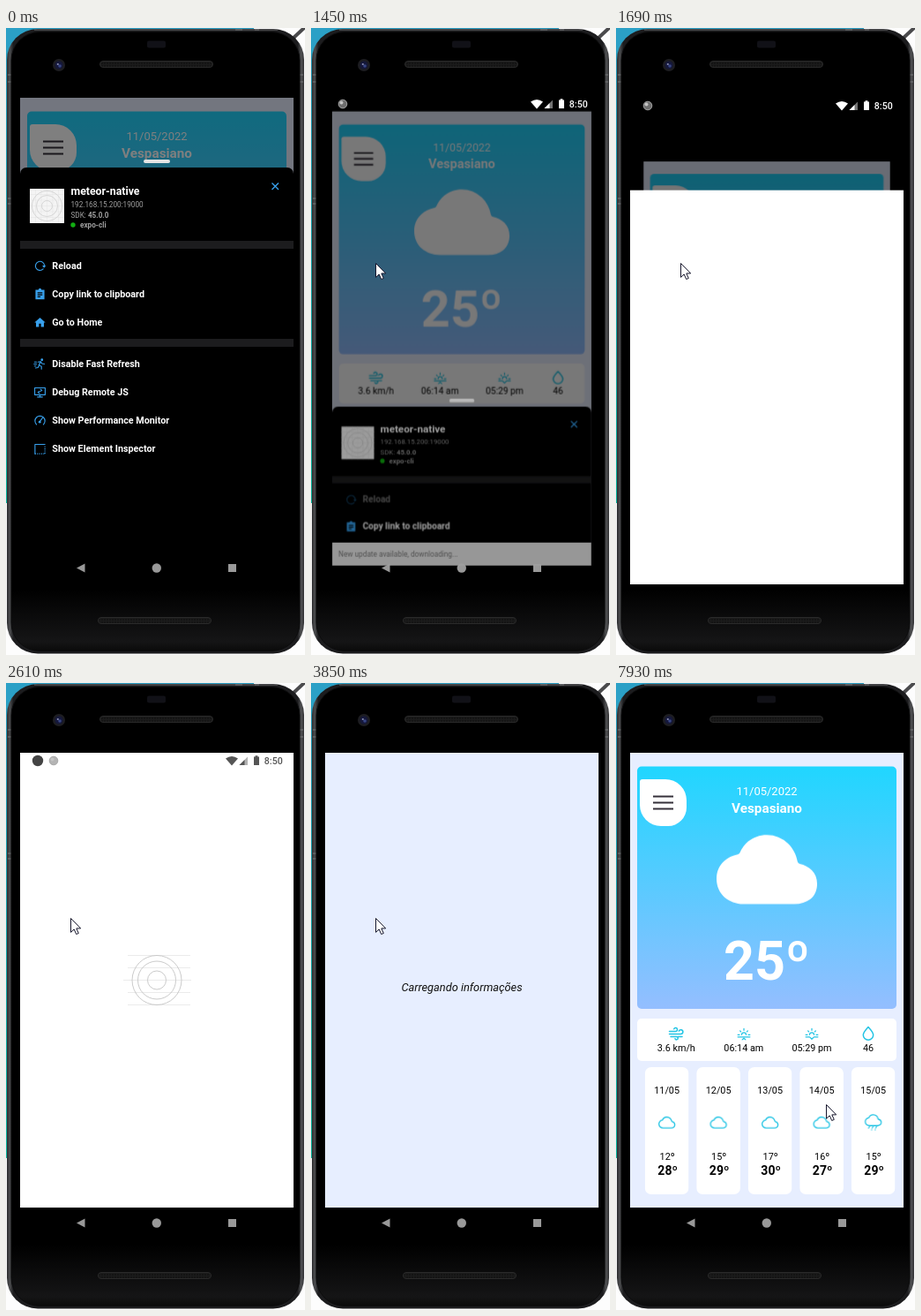
An HTML page that plays this animation: 339 px wide and 710 px high, repeating every 7.99 s.

```html
<!DOCTYPE html>
<html lang="pt">
<head>
<meta charset="utf-8">
<title>Weather app reload</title>
<style>
html,body{margin:0;width:100%;height:100%;overflow:hidden;background:#fdfdfd}
svg{display:block;width:100vw;height:100vh}
text{font-family:Roboto,sans-serif}
.mid{text-anchor:middle}
.b{font-weight:700}
.s{font-size:10.8px}
.row{font-size:10.75px;font-weight:700;fill:#fff}
.tiny{font-size:8.2px;fill:#a0a0a0}
.ln{fill:none;stroke:currentColor;stroke-width:2;stroke-linecap:round;stroke-linejoin:round}
.thin{stroke-width:1.5}
#cursor,#act,#veil,#sheet,#menu,#rise,#splash,#logo,#note,#status,#dot,#badge{animation:7990ms linear infinite}
#reload,#toast,#load,.late,.head,.temp,.nudge{animation:7990ms step-end infinite}

#cursor{animation-name:cursor}
@keyframes cursor{
  0%,4.4%{transform:translate(322px,716px);animation-timing-function:cubic-bezier(.35,.1,.35,1)}
  12.6%{transform:translate(61px,254px);animation-timing-function:ease-in-out}
  14.268%,91.9%{transform:translate(73px,266px);animation-timing-function:cubic-bezier(.4,.1,.4,1)}
  99.249%,100%{transform:translate(238px,477px)}
}
#act{animation-name:act;transform-origin:171px 354.5px}
@keyframes act{
  0%,16.5%{transform:none;opacity:1}
  18.148%{transform:translateY(1px) scale(.948);opacity:.95}
  21.151%{transform:translateY(44.5px) scale(.9);opacity:.92}
  23%{transform:translateY(70px) scale(.88);opacity:.9;animation-timing-function:step-end}
  23.03%{transform:none;opacity:0;animation-timing-function:step-end}
  81.977%,100%{transform:none;opacity:1}
}
#veil{animation-name:veil}
@keyframes veil{0%,23%{opacity:.5}23.01%,100%{opacity:0}}
#sheet{animation-name:sheet}
@keyframes sheet{
  0%,15.6%{transform:none;opacity:1;animation-timing-function:cubic-bezier(.4,0,.8,.8)}
  18.148%{transform:translateY(272px);opacity:1}
  19.7%{transform:translateY(446px);opacity:1}
  23%{transform:translateY(446px);opacity:1;animation-timing-function:step-end}
  23.01%,100%{transform:translateY(446px);opacity:0}
}
#menu{animation-name:menu}
@keyframes menu{0%,15.6%{opacity:1}18.148%{opacity:.68}19.7%,100%{opacity:.5}}
#reload{animation-name:reload}
@keyframes reload{0%{opacity:1}15.019%,100%{opacity:.45}}
#toast{animation-name:toast}
@keyframes toast{0%{opacity:0}17.27%{opacity:1}23%,100%{opacity:0}}
#rise{animation-name:rise}
@keyframes rise{
  0%,18.4%{transform:translateY(551px);animation-timing-function:cubic-bezier(.3,.4,.6,.85)}
  21.151%{transform:translateY(106px);animation-timing-function:cubic-bezier(.3,.5,.6,1)}
  22.9%,23%{transform:none;animation-timing-function:step-end}
  23.03%,100%{transform:translateY(560px)}
}
#splash{animation-name:splash}
@keyframes splash{
  0%{opacity:0;animation-timing-function:step-end}
  22.9%,43%{opacity:1}
  48%,100%{opacity:0}
}
#logo,#badge{animation-name:logo}
@keyframes logo{0%,26.8%{opacity:0}30.413%,100%{opacity:1}}
#note{animation-name:note}
@keyframes note{0%,26.8%{opacity:0}29%{opacity:1;animation-timing-function:step-end}32.666%,100%{opacity:0}}
#load{animation-name:load}
@keyframes load{0%{opacity:0}43%{opacity:1}81.977%,100%{opacity:0}}
#status{animation-name:status}
@keyframes status{
  0%,16.6%{color:#fff;transform:translateY(-12px);opacity:0}
  17.2%{opacity:1}
  18.148%{color:#fff;transform:translateY(-2px)}
  18.9%,26.8%{color:#fff;transform:none}
  30.413%{color:#555;transform:none}
  43%{opacity:1}
  46%,100%{color:#555;transform:none;opacity:0}
}
#dot{animation-name:dot}
@keyframes dot{
  0%,22.2%{opacity:1;transform:none;color:#6e6e6e}
  22.65%{opacity:0;transform:none;color:#6e6e6e;animation-timing-function:step-end}
  26.8%{opacity:0;transform:translateX(18px);color:#b4b4b4}
  30.413%,100%{opacity:1;transform:translateX(18px);color:#b4b4b4}
}
.late{animation-name:late}
@keyframes late{0%{opacity:1}50%{opacity:0}83.479%,100%{opacity:1}}
.head{animation-name:head}
@keyframes head{0%{transform:none}50%{transform:translateY(53px)}83.479%,100%{transform:none}}
.temp{animation-name:temp}
@keyframes temp{0%{transform:none}50%{transform:translateY(-53px)}83.479%,100%{transform:none}}
.nudge{animation-name:nudge}
@keyframes nudge{0%{transform:none}50%{transform:translateY(-1px)}83.479%,100%{transform:none}}
</style>
</head>
<body>
<svg viewBox="0 0 339 710" preserveAspectRatio="none">
<defs>
  <linearGradient id="teal" x2="0" y2="1"><stop stop-color="#2ba0c6"/><stop offset="1" stop-color="#0fbfa6"/></linearGradient>
  <linearGradient id="rim"><stop stop-color="#2e2e30"/><stop offset=".01" stop-color="#4c4d4f"/><stop offset=".022" stop-color="#1c1c1e"/><stop offset=".978" stop-color="#1c1c1e"/><stop offset=".99" stop-color="#505153"/><stop offset="1" stop-color="#343436"/></linearGradient>
  <linearGradient id="face" x2="0" y2="1"><stop offset=".9" stop-color="#000"/><stop offset=".985" stop-color="#151516"/><stop offset="1" stop-color="#0a0a0a"/></linearGradient>
  <linearGradient id="sky" x2="0" y2="1"><stop stop-color="#20d6ff"/><stop offset="1" stop-color="#94beff"/></linearGradient>
  <pattern id="mesh" width="3" height="3" patternUnits="userSpaceOnUse"><rect width="3" height="3" fill="#1b1b1b"/><circle cx="1" cy="1" r=".8" fill="#0a0a0a"/></pattern>
  <clipPath id="screen"><rect x="16" y="79" width="310" height="551"/></clipPath>
  <clipPath id="page"><rect x="16" y="79" width="310" height="515"/></clipPath>
  <path id="cloud" d="M396 432H136c-36 0-70-13-96-35C14 373 0 340 0 304c0-37 13-68 39-91 18-17 42-28 69-34a16 16 0 0 0 11-9 156 156 0 0 1 42-57C188 92 220 80 256 80a154 154 0 0 1 107 43c25 24 42 55 49 92a16 16 0 0 0 12 12C470 237 512 270 512 328c0 33-12 61-35 79-21 16-49 25-81 25z"/>
</defs>

<!-- desk and phone -->
<rect width="339" height="710" fill="#fdfdfd"/>
<rect width="60" height="538" fill="url(#teal)"/>
<rect width="281" height="20" fill="#2ba0c6"/>
<path d="M325 12 339-1" stroke="#4a4a4c" stroke-width="4"/>
<rect x="1" y="1" width="337" height="707.5" rx="35" fill="url(#rim)"/>
<path d="M32 2H308" stroke="#6c6d6f" stroke-width="1.2"/>
<path d="M2 53h4M2 61h4M2 193h4M2 199h4M333 53h4M333 61h4M260 2h8M282 2h5" stroke="#77787a"/>
<rect x="6" y="4.500" width="327" height="701" rx="32" fill="url(#face)" stroke="#0c0c0d"/>
<rect x="160" y="14.500" width="21" height="8" rx="2" fill="#111117"/>
<g fill="url(#mesh)" stroke="#2a2a2a">
  <rect x="106.500" y="37.500" width="128" height="7" rx="3.500"/>
  <rect x="104.500" y="667.500" width="128" height="7" rx="3.500"/>
</g>
<circle cx="60" cy="42" r="7" fill="#1d1d21"/>
<circle cx="60" cy="42" r="4.500" fill="#15183a"/>
<circle cx="61" cy="43" r="1.800" fill="#384585"/>
<circle cx="58.800" cy="41" r="1.100" fill="#8a90b4"/>
<g fill="#999">
  <path d="M80 611.500 89.500 606.500V616.500z"/>
  <circle cx="170.800" cy="611.500" r="5.200"/>
  <rect x="252" y="607" width="9" height="9"/>
</g>

<g clip-path="url(#screen)">
  <!-- weather page -->
  <g id="act">
    <g clip-path="url(#page)">
      <rect x="16" y="79" width="310" height="515" fill="#e7eeff"/>
      <rect x="24" y="94.500" width="294" height="274.500" rx="5" fill="url(#sky)"/>
      <path d="M30 109H56a24 24 0 0 1 24 24v8a21 21 0 0 1-21 21H51a24 24 0 0 1-24-24V112a3 3 0 0 1 3-3z" fill="#fff"/>
      <path d="M42 128.500h23M42 135.500h23M42 142.500h23" stroke="#35303a" stroke-width="2"/>
      <g fill="#fff" class="mid">
        <g class="head">
          <text x="171" y="126.900" font-size="13">11/05/2022</text>
          <text x="171" y="146.800" font-size="15.300" class="b">Vespasiano</text>
        </g>
        <g class="late"><use href="#cloud" transform="translate(114 154.200) scale(.2227)"/></g>
        <text x="171" y="336.300" font-size="61" class="b temp">25º</text>
      </g>
      <rect x="24" y="380" width="294" height="48" rx="5" fill="#fff"/>
      <g class="nudge">
        <g color="#23c4e4">
          <path class="ln thin" d="M60.500 394.500h7a2 2 0 1 0-1.800-2.800M60.500 397.500h13a2.400 2.400 0 1 0-2.200-3.400M62 400.500h6.500a1.700 1.700 0 1 1-1.500 2.300M70.500 400.500h4.500"/>
          <path class="ln thin" d="M286 389.500c3 3.400 5.700 6 5.700 9a5.700 5.700 0 0 1-11.400 0c0-3 2.700-5.600 5.700-9z"/>
          <g class="late" id="suns"></g>
        </g>
        <g class="mid s">
          <text x="68.300" y="417">3.6 km/h</text><text x="144.800" y="417">06:14 am</text>
          <text x="222" y="417">05:29 pm</text><text x="286" y="417">46</text>
        </g>
      </g>
      <g id="days" class="mid" color="#23c4e4"></g>
      <rect id="veil" x="16" y="79" width="310" height="515" fill="#000"/>
      <!-- developer menu -->
      <g id="sheet">
        <path d="M16 600V165a7 7 0 0 1 7-7H319a7 7 0 0 1 7 7V600z"/>
        <g id="menu">
          <rect x="156" y="149" width="30" height="4" rx="2" fill="#e4e4e4"/>
          <rect x="27" y="182" width="39" height="39" fill="#f4f4f4"/>
          <path d="M27 188.500h39M27 195h39M27 201.500h39M27 208h39M27 214.500h39M33.500 182v39M40 182v39M46.500 182v39M53 182v39M59.500 182v39" stroke="#e6e6e6" stroke-width=".6"/>
          <g fill="none" stroke="#cfcfcf" stroke-width=".8"><circle cx="46.500" cy="201.500" r="17"/><circle cx="46.500" cy="201.500" r="12"/><circle cx="46.500" cy="201.500" r="6"/></g>
          <text x="73.500" y="188.800" font-size="12.300" class="b" fill="#fff">meteor-native</text>
          <text x="73.500" y="202.500" class="tiny">192.168.15.200:19000</text>
          <text x="73.500" y="215" class="tiny">SDK: <tspan class="b">45.0.0</tspan></text>
          <circle cx="76" cy="223" r="2.700" fill="#12ad12"/>
          <text x="84" y="226" class="tiny b">expo-cli</text>
          <path d="M301.500 175.500l7.500 7.500M309 175.500l-7.500 7.500" stroke="#38a0ec" stroke-width="1.400"/>
          <path d="M16 245.500H326M16 356.500H326" stroke="#1c1c1e" stroke-width="9"/>
          <g id="rows" color="#38a0ec"></g>
        </g>
      </g>
    </g>
    <g id="toast">
      <rect x="16" y="594" width="310" height="27.500" fill="#a0a0a0"/>
      <text x="23.500" y="611" font-size="8.700" fill="#555">New update available, downloading...</text>
    </g>
  </g>

  <rect id="rise" x="16" y="79" width="310" height="551" fill="#fff"/>

  <g id="load">
    <rect x="16" y="79" width="310" height="515" fill="#e7eeff"/>
    <text x="171" y="349.300" class="mid" font-size="12.800" font-style="italic" fill="#111">Carregando informações</text>
  </g>
  <g id="splash">
    <rect x="16" y="79" width="310" height="515" fill="#fff"/>
    <g id="logo" fill="none">
      <path d="M138 308.500h71M138 322.500h71M133 336.500h77M138 350.500h71M138 364.500h71" stroke="#ebebeb"/>
      <g stroke="#c4c4c4" stroke-width=".9"><circle cx="171" cy="336.500" r="28"/><circle cx="171" cy="336.500" r="21.500"/><circle cx="171" cy="336.500" r="10.500"/></g>
    </g>
    <text id="note" x="23.500" y="584.300" font-size="8.700" fill="#8a8a8a">New update available, downloading...</text>
  </g>

  <g id="status" fill="currentColor">
    <circle id="badge" cx="36" cy="88" r="6.200" fill="#444"/>
    <g id="dot"><circle cx="36" cy="88" r="4.800" stroke="#a6a6a6"/><circle cx="34.500" cy="86.500" r="2" fill="#c4c4c4"/></g>
    <path d="M249 85.500q7-5 14 0l-7 8z"/>
    <path d="M264.500 93H274V83.500z" opacity=".45"/><path d="M264.500 93H270.500V87z"/>
    <path d="M281 83.500h1.600V82.300h2.800V83.500H287V93H281z"/>
    <text x="292.800" y="92" font-size="10.600" font-weight="500">8:50</text>
  </g>
</g>

<g id="cursor"><path d="M.5.500V16.300L4.200 12.900 6.700 18.500 9.300 17.400 6.800 11.900H11.700z" fill="#fff" stroke="#16162c"/></g>
</svg>

<script>
const put = (id, html) => document.getElementById(id).innerHTML = html;
const line = d => `<path class="ln" d="${d}"/>`;
const solid = d => `<path fill="currentColor" d="${d}"/>`;
const icon = (x, y, size, body) =>
  `<g transform="translate(${x - size / 2} ${y - size / 2}) scale(${size / 24})">${body}</g>`;

// sunrise and sunset
const sun = caret => line('M8 14a4 4 0 0 1 8 0M1 14h3M20 14h3M12 3v3M5 7l1.500 1.500M19 7l-1.500 1.500' + caret);
put('suns', icon(145, 397, 15, sun('M1 18h6.500l4.500 0 0 0M12 18h11M9 23l3-2.500 3 2.500')) +
  icon(222, 397, 15, sun('M1 18h7M16 18h7M9 19l3 3 3-3')));

// forecast
const forecast = [['11', 12, 28], ['12', 15, 29], ['13', 17, 30], ['14', 16, 27], ['15', 15, 29]];
const outline = y => `<use href="#cloud" fill="none" stroke="currentColor" stroke-width="38" transform="translate(-9 ${y}) scale(.0352)"/>`;
const rain = '<path fill="none" stroke="currentColor" stroke-width="1.200" d="M-4 502l-1.500 2.500M0 502l-1.500 2.500M4 502l-1.500 2.500M-1.500 505.500l-.6 1M2.500 505.500l-.6 1"/>';
put('days', forecast.map(([day, low, high], i) => `
  <g transform="translate(${57.6 + i * 58.5} 0)">
    <rect x="-24.800" y="435" width="49.600" height="144" rx="7" fill="#fff"/>
    <text class="s" y="465">${day}/05</text>
    <g class="late">${i < 4 ? outline(488.6) : outline(486) + rain}</g>
    <g class="nudge"><text class="s" x=".5" y="539.500">${low}º</text>
    <text class="b" x="1" y="557" font-size="14">${high}º</text></g>
  </g>`).join(''));

// menu rows
const rows = [
  ['Reload', 269.5, line('M18.500 18A9 9 0 1 1 21 12') + solid('M16.500 11h7.500l-3.700 5z')],
  ['Copy link to clipboard', 301.5, solid('M3 3h6a3 3 0 0 1 6 0h6v19H3z') + '<path d="M7 9h10M7 13h10M7 17h6" stroke="#000" stroke-width="2"/>'],
  ['Go to Home', 333.5, solid('M10 21v-7h4v7h6v-9h3L12 2 1 12h3v9z')],
  ['Disable Fast Refresh', 380.5, '<circle cx="16" cy="3.500" r="2.500" fill="currentColor"/>' + line('M8 8l5-1 3 4 5 1M13 8l-3 6 5 3v5M10 15l-2 4-5 1M1 8h4M0 12h5M1 16h3')],
  ['Debug Remote JS', 412.5, line('M1.500 3h21v14h-21zM12 17v4M7 21.500h10M13 6l3 2-3 2M11 10l-3 2 3 2')],
  ['Show Performance Monitor', 444.5, line('M5 20a10 10 0 1 1 14 0M11 15l6-8') + '<circle cx="11.500" cy="15" r="2.500" fill="currentColor"/>'],
  ['Show Element Inspector', 476.5, line('M2 22V3H22') +
    '<path d="M22 7V23M2 22H22" fill="none" stroke="currentColor" stroke-width="2.200" stroke-dasharray="2 2.200"/>']
];
put('rows', rows.map(([label, y, art], i) =>
  `<g${i ? '' : ' id="reload"'}>${icon(38.5, y, 13.5, art)}<text class="row" x="52.300" y="${y + 3.5}">${label}</text></g>`).join(''));
</script>
</body>
</html>
```
